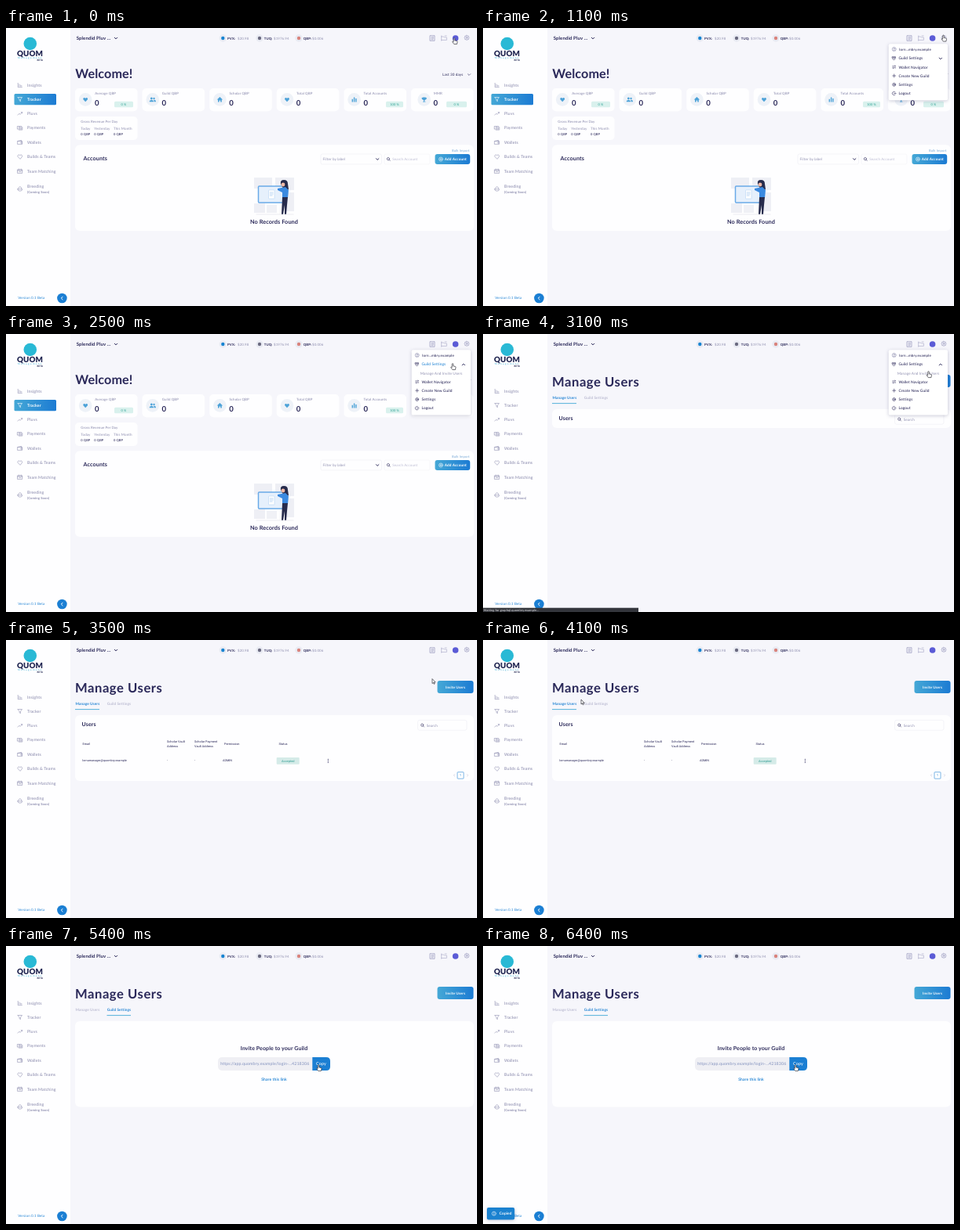
An HTML page that plays this animation: 600 by 355 pixels, repeating every 6500 ms.

```html
<!DOCTYPE html>
<html lang="en">
<head>
<meta charset="utf-8">
<title>Guild invite walkthrough</title>
<style>
html, body { margin: 0; width: 100%; height: 100%; overflow: hidden; background: #f6f6fb; }
svg { display: block; width: 600px; height: 355px; }
text { font-family: Lato, "Open Sans", sans-serif; letter-spacing: .1px; text-rendering: geometricPrecision; white-space: pre; }
.table text { font-family: Roboto, "Liberation Sans", sans-serif; letter-spacing: 0; }
.title { letter-spacing: .55px; }
.line { fill: none; stroke-width: .6; stroke-linecap: round; stroke-linejoin: round; }
.bold { stroke-width: 1; }
.lift { filter: drop-shadow(0 1px 2px rgba(40, 40, 90, .25)); }
</style>
</head>
<body>
<svg id="stage" viewBox="0 0 600 355"></svg>
<script>
const LOOP = 6500, STEP = 100;
const NAVY = '#2a2859', GREY = '#8f8fb0', PALE = '#bcbcd2', BLUE = '#2384d4', MINT = '#d9f1ed', TEAL = '#35a598';

const text = (x, y, s, size, fill = NAVY, weight = 400, extra = '') =>
  `<text x="${x}" y="${y}" font-size="${size}" fill="${fill}" font-weight="${weight}" ${extra}>${s}</text>`;
const mid = (x, y, s, size, fill, weight) => text(x, y, s, size, fill, weight, 'text-anchor="middle"');
const rect = (x, y, w, h, r, fill, extra = '') =>
  `<rect x="${x}" y="${y}" width="${w}" height="${h}" rx="${r}" fill="${fill}" ${extra}/>`;
const dot = (x, y, r, fill, extra = '') => `<circle cx="${x}" cy="${y}" r="${r}" fill="${fill}" ${extra}/>`;
const line = (x, y, d, color = GREY, extra = '', weight = '') =>
  `<path class="line ${weight}" transform="translate(${x} ${y})" d="${d}" stroke="${color}" ${extra}/>`;
const shape = (x, y, d, fill) => `<path transform="translate(${x} ${y})" d="${d}" fill="${fill}"/>`;
const group = (id, body, extra = '') => `<g id="${id}" ${extra}>${body}</g>`;

const DOWN = 'M-1.7-.8L0 .9 1.7-.8', UP = 'M-1.7 .8L0-.9 1.7 .8';
const LENS = 'M1.1 1.1L2.2 2.2M1.5-.2A1.6 1.6 0 1 1-1.7-.2 1.6 1.6 0 1 1 1.5-.2';
const HEART = 'M0 2.8L-2.6 .2C-3.8-1.5-1.4-3.6 0-1.5 1.4-3.6 3.8-1.5 2.6 .2Z';
const RING = 'M2.5 0A2.5 2.5 0 1 1-2.5 0 2.5 2.5 0 1 1 2.5 0';
const GEAR = 'M0-3L1-2.2 2.2-2.2 2.4-1 3 0 2.4 1 2.2 2.2 1 2.3 0 3-1 2.3-2.2 2.2-2.4 1-3 0-2.4-1-2.2-2.2-1-2.2ZM1 0A1 1 0 1 1-1 0 1 1 0 1 1 1 0';
const PEOPLE = 'M-1.4-2.8A1.4 1.4 0 1 1-1.5-2.8ZM1.8-2.6A1.2 1.2 0 1 1 1.7-2.6ZM-4 2.8V1.6Q-1.4-.6 1.1 1.6V2.8ZM1.8 2.8V1.4L1.1 .6Q3-.1 4 1.5V2.8Z';
const HOUSE = 'M0-3.4L3.7 0H2.4V3H.8V1H-.8V3H-2.4V0H-3.7Z';
const BARS = 'M-3-.6H-1.6V3H-3ZM-.7-3H.7V3H-.7ZM1.6-1.4H3V3H1.6Z';
const CUP = 'M-2-3H2V-2.3H3.2Q3.2 .2 1.4 .4L.5 1.2V2.3H1.7V3.1H-1.7V2.3H-.5V1.2L-1.4 .4Q-3.2 .2-3.2-2.3H-2Z';

const NAV = [
  ['Insights', 73, 'M-2.6-2.6V2.6H2.6M-1 1.2V-1M.6 1.2V0M2 1.2V.4'],
  ['Tracker', 91, 'M-2.7-2.5H2.7L.7 .2V2.6L-.7 1.8V.2Z'],
  ['Pluvs', 109.3, 'M-2.8 1.8L-1 0 .4 1 2.8-1.7M1.4-1.7H2.8V-.4'],
  ['Payments', 127.5, 'M-3-2H2V1.6H-3ZM-1.4 2.6H3V-.8M.5-.2A1 1 0 1 1-1.5-.2 1 1 0 1 1 .5-.2'],
  ['Wallets', 146, 'M-2.8-1.5L1.8-2.6V-1.5M-2.8-1.5H2.8V2.4H-2.8ZM2.8-.2H1V1.1H2.8'],
  ['Builds &amp; Teams', 164.3, HEART],
  ['Team Matching', 183, 'M-2.9-2.2H2.9V2.4H-2.9ZM-2.9-.8H2.9M-1.4-3V-1.5M1.4-3V-1.5M-1 1L0 .2 1 1'],
  ['Breeding', 205.5, 'M-3 .3H3Q2.8 2.7 0 2.7T-3 .3ZM-2-.3Q-1.9-2.7 0-2.8 1.9-2.7 2-.3']
];

function sidebar() {
  const items = NAV.map(([name, y, icon], i) =>
    line(17.8, y, icon) + text(27, i === 7 ? 203.8 : y + 1.8, name, 5.25, GREY, 500)).join('');
  const active = rect(10.5, 84, 53.5, 14.3, 1.5, 'url(#cta)') + line(17.8, 91, NAV[1][2], '#fff') +
    text(27, 92.8, 'Tracker', 5.2, '#fff', 700);
  return rect(0, 0, 82, 355, 0, '#fefeff') +
    dot(30.8, 20, 8.3, '#29b9d5') +
    text(14, 36.3, 'QUOM', 9.8, '#1f2450', 900) +
    text(15, 39.2, 'Management', 3, '#29a9d0', 400, 'style="letter-spacing:1.4px"') +
    text(39.5, 42, 'BETA', 3, '#1f2450', 700) +
    items + text(27, 210.8, '(Coming Soon)', 4.2, GREY, 700) + group('active', active) +
    text(15.3, 346.2, 'Version 0.1 Beta', 4.5, BLUE) +
    dot(71.4, 345, 6.3, '#1b7fd3') + line(71.2, 345, 'M.9-1.8L-.9 0 .9 1.8', '#fff', '', 'bold');
}

function topbar() {
  const coins = [[276.3, 'PVX:', '$20.98', 295, '#1884d2'], [323, 'TUQ:', '$1976.94', 341, '#6a6a80'], [373, 'QBP:', '$0.006', 390, '#d9837c']];
  return text(89.7, 14.8, 'Splendid Pluv ...', 6, NAVY, 700) + line(140, 13, DOWN, NAVY, '', 'bold') +
    coins.map(([x, name, price, px, color]) =>
      dot(x, 13, 4.7, '#e9ebf3') + dot(x, 13, 2.2, color) +
      text(x + 5.8, 14.5, name, 4.3, NAVY, 700) + text(px, 14.5, price, 4.4, GREY)).join('') +
    line(543.2, 13, 'M-2.8-3.3H2.8V3.3H-2.8ZM-1.3-1.4H1.3M-1.3 .2H1.3M-1.3 1.8H.8', '#8585b0') +
    line(558, 13, 'M-3.3-3V3.2M-3.3-2H-.6L.4-1H3.4V2.4H-3.3M1-3H3.2', '#a4a4c4') +
    dot(572.6, 13, 3.8, '#5b5bd6') + line(587, 12.4, GEAR, '#8585b0');
}

function dashboard() {
  const cards = [['Average QBP', HEART], ['Guild QBP', PEOPLE], ['Scholar QBP', HOUSE], ['Total QBP', HEART],
    ['Total Accounts', BARS], ['MMR', CUP]];
  const badges = { 0: [138, 24, '0 %'], 4: [484, 22, '100 %'], 5: [561, 26, '0 %'] };
  const tiles = cards.map(([name, icon], i) => {
    const x = 88 + 85.6 * i, push = i === 5 ? 3.5 : 0, b = badges[i];
    return rect(x, 77, 79.6, 29.3, 5, '#fefeff') + dot(x + 13.2 + push, 91.4, 8.3, '#eef2f8') +
      shape(x + 13.2 + push, 91.4, icon, '#4ca2d8') +
      text(x + 25.2 + push, 85.4, name, 4.4, GREY, 500) + text(x + 25 + push, 98.6, '0', 9.6, NAVY, 700) +
      (b ? rect(b[0], 93.8, b[1], 7.4, 1.5, MINT) + mid(b[0] + b[1] / 2, 98.9, b[2], 4, TEAL, 500) : '');
  }).join('');
  const revenue = rect(88, 113, 79.6, 30, 5, '#fefeff') + text(95.3, 120.8, 'Gross Revenue Per Day', 4.4, GREY, 500) +
    [[95.3, 'Today'], [112.3, 'Yesterday'], [137, 'This Month']].map(([x, s]) =>
      text(x, 129.6, s, 4.5, GREY) + text(x, 137, '0 QBP', 4, NAVY, 500)).join('');
  const accounts = rect(88, 149.3, 508, 109.7, 6, '#fefeff') + text(98.5, 169.3, 'Accounts', 7.2, NAVY, 700) +
    text(568, 157.8, 'Bulk Import', 4.2, '#7aaad6') +
    rect(401, 161, 77.5, 13, 2, '#fefeff', 'stroke="#ececf3" stroke-width=".6"') +
    text(403.6, 169, 'Filter by label', 4.6, GREY) + line(473.2, 167.5, DOWN, NAVY, '', 'bold') +
    rect(482, 161, 58, 13, 2, '#fefeff', 'stroke="#f1f1f6" stroke-width=".6"') +
    line(487, 167.3, LENS, NAVY) + text(492.3, 169, 'Search Account', 4.5, PALE) +
    rect(546.5, 161, 44.7, 13, 3, 'url(#cta)') + line(554, 167.5, RING + 'M-1.2 0H1.2M0-1.2V1.2', '#fff') +
    text(558.8, 169.1, 'Add Account', 4.7, '#fff', 700) + picture() +
    mid(341.5, 249.6, 'No Records Found', 7.3, NAVY, 700);
  return text(88.3, 64.3, 'Welcome!', 16.2, NAVY, 700) +
    text(556, 61.2, 'Last 30 days', 4.6, NAVY) + line(590, 59.5, DOWN, NAVY) + tiles + revenue + accounts;
}

function picture() {
  return rect(316, 191, 23, 14, 0, '#eeeff5') + rect(343, 191, 24, 16, 0, '#eeeff5') +
    rect(316, 224, 14, 12, 0, '#eeeff5') + rect(332, 226, 13, 10, 0, '#f0f1f6') + rect(357, 210, 10, 24, 0, '#eeeff5') +
    rect(321.5, 202, 32, 21, 1, '#e6f0fc', 'stroke="#6aaae8" stroke-width="1.5"') +
    rect(334.5, 207, 7.5, 11, .5, '#fff', 'stroke="#a8cdf2" stroke-width=".5"') +
    line(338.2, 212, 'M-2-2H2M-2 0H2M-2 2H1', '#8fbdec') +
    shape(354, 196, 'M-4 3Q-5-2 0-2 5-2 5 3L6 10 2 12-2 7Z', '#262b4c') +
    dot(353, 200, 2.4, '#f0b9a6') +
    shape(354, 203, 'M-3 1L2 0 6 4 5 14H-2L-2 7-8 4-8 2Z', '#3b8ae0') +
    shape(354, 216, 'M-2 0H5L4 10 3 22H1L1 10-1 22H-3Z', '#262b4c') +
    line(341, 238, 'M-22 0H25', '#dddde8');
}

function managePage() {
  const tabs = (a, b) => text(88.5, 83, 'Manage Users', 4.7, a, 700) + text(128.7, 83, 'Guild Settings', 4.7, b, 700);
  const underline = (x, w) => rect(x, 88.2, w, .9, 0, '#43a9d6');
  const head = [[97.5, 'Email'], [278, 'Permission'], [347.5, 'Status']].map(([x, s]) => text(x, 133.7, s, 3.9, NAVY)).join('') +
    [[205, 'Scholar Vault', 'Address'], [240, 'Scholar Payment', 'Vault Address']].map(([x, a, b]) =>
      text(x, 130.7, a, 3.9, NAVY) + text(x, 136.5, b, 3.9, NAVY)).join('');
  const row = text(97.3, 155.3, 'lornamanager@quombry.example', 3.75, NAVY) + text(205, 155, '-', 4) + text(240, 155, '-', 4) +
    text(276, 155.3, 'ADMIN', 3.8, NAVY) + rect(344.7, 150, 29, 8.8, 1, '#d5ebe8') + mid(359.2, 155.8, 'Accepted', 3.9, '#2b9a90') +
    [-2, 0, 2].map(d => dot(410.3, 154.4 + d, .55, NAVY)).join('') +
    line(571, 172.8, 'M.6-1.2L-.6 0 .6 1.2', PALE) + line(588, 172.8, 'M-.6-1.2L.6 0-.6 1.2', PALE) +
    rect(575, 168.7, 8, 8.4, .8, '#fff', `stroke="${BLUE}" stroke-width=".6"`) + mid(579, 174.4, '1', 4.2, BLUE);
  const users = rect(88, 96, 508, 24, 6, '#fefeff', 'id="panel"') + text(96.6, 110.2, 'Users', 7, NAVY, 700) +
    rect(524.5, 102.3, 62.5, 13, 2.5, '#fefeff', 'stroke="#ededf4" stroke-width=".6"') +
    line(530.3, 108.8, LENS, NAVY) + text(535.7, 110.6, 'Search', 4.6, GREY) + group('rows', head + row, 'class="table"');
  const invite = rect(88, 96, 508, 109.5, 6, '#fefeff') + mid(341.5, 132.8, 'Invite People to your Guild', 7, NAVY, 700) +
    rect(270, 142, 125, 17, 5, '#efeff4') +
    text(273.2, 152.3, 'https://app.quombry.example/login-...4218306', 5.3, '#8190bd') +
    `<path d="M390.3 142H408Q413 142 413 147V154Q413 159 408 159H390.3Z" fill="#1b7fd3"/>` +
    mid(401.5, 152.3, 'Copy', 5.4, '#fff', 500) + mid(341.5, 171.8, 'Share this link', 5, BLUE, 700);
  return text(88, 67.3, 'Manage Users', 16.6, NAVY, 700, 'class="title"') +
    rect(549.5, 52, 46, 16, 3, 'url(#cta)') + mid(572.5, 61.6, 'Invite Users', 4.5, '#fff', 700) +
    group('users', tabs(BLUE, PALE) + underline(88, 31) + users) +
    group('invite', tabs(PALE, BLUE) + underline(128.5, 30.5) + invite);
}

function menu() {
  const item = (y, s, icon) => line(523.7, y, icon, NAVY) + text(529.5, y + 1.7, s, 4.8, NAVY, 500);
  const lower = item(49.8, 'Wallet Navigator', 'M-2-1H2L1-2M2 1H-2L-1 2') + item(61, 'Create New Guild', 'M-2 0H2M0-2V2') +
    item(72.3, 'Settings', 'M2 0A2 2 0 1 1-2 0 2 2 0 1 1 2 0M.7 0A.7 .7 0 1 1-.7 0 .7 .7 0 1 1 .7 0') +
    item(83.5, 'Logout', 'M1.4-1.6A2.2 2.2 0 1 0 1.4 1.6M0 0H2.4');
  return rect(516.7, 20.3, 75.3, 72, 2, '#fff', 'id="sheet" class="lift"') +
    line(523.7, 27, RING + 'M.8-.7A.8 .8 0 1 1-.8-.7 .8 .8 0 1 1 .8-.7M-1.5 1.8Q0 .3 1.5 1.8') +
    text(530.3, 28.7, 'lorn...mbry.example', 4.5, NAVY, 500) +
    line(523.5, 38.5, 'M-2.2-1.6H2.2L1.4 1.2 0 2.2-1.4 1.2ZM-1-1.6L0 .6 1-1.6', NAVY) +
    text(529.5, 40.2, 'Guild Settings', 4.8, NAVY, 500, 'id="guild"') +
    line(582.8, 39, DOWN, NAVY, 'id="fold"', 'bold') +
    text(527.7, 51.5, 'Manage And Invite Users', 4.7, GREY, 400, 'id="sub"') + group('lower', lower);
}

const overlays =
  group('status', rect(0, 349.7, 198, 5.3, 0, '#34363c') + text(.5, 354, 'Waiting for graphql.quombry.example...', 3.9, '#e4e4e8')) +
  group('toast', rect(5, 334, 35.2, 15.5, 2, '#1b82d0', 'class="lift"') + line(14, 341.7, RING + 'M0-.2V1.3M0-1.3V-1.2', '#fff') +
    text(20.8, 343.4, 'Copied', 4.8, '#fff', 700)) +
  group('cursor', `<path id="hand" d="M-.8 .5Q-.8-.3 0-.3T.8 .5V3L3 3.4Q4 3.6 4 4.6L3.4 7.6H-.2L-2.3 4.8Q-2.4 4-1.6 4.1L-.8 4.7Z"/>
    <path id="arrow" d="M0 0V6L1.4 4.8 2.3 6.8 3.2 6.4 2.3 4.4H4.2Z"/>`,
    'fill="#fff" stroke="#24242c" stroke-width=".65" stroke-linejoin="round"');

document.getElementById('stage').innerHTML =
  `<defs><linearGradient id="cta"><stop stop-color="#45a8d6"/><stop offset="1" stop-color="#1c7bd3"/></linearGradient></defs>` +
  rect(0, 0, 600, 355, 0, '#f6f6fb') + sidebar() + topbar() + group('home', dashboard()) + group('manage', managePage()) +
  group('menu', menu()) + overlays;

const el = {};
document.querySelectorAll('#stage [id]').forEach(n => el[n.id] = n);
const show = (id, v) => el[id].setAttribute('opacity', +v);
const set = (id, name, v) => el[id].setAttribute(name, v);
const ramp = (t, a, b) => Math.min(1, Math.max(0, (t - a) / (b - a)));
const ease = p => p * p * (3 - 2 * p);

// time, x, y of the pointer tip
const PATH = [[0, 571, 13], [100, 571, 13], [600, 586.5, 9.5], [1400, 586.5, 9.5], [1900, 569, 38], [2500, 569, 38],
  [2800, 567.5, 48], [3400, 567.5, 48], [4100, 125, 76], [4400, 142, 79], [4800, 142, 79], [5300, 398, 152], [LOOP, 398, 152]];

function pointer(t) {
  const i = PATH.findIndex(k => k[0] > t), a = PATH[i - 1], b = PATH[i];
  const p = ease(ramp(t, a[0], b[0]));
  return [a[1] + (b[1] - a[1]) * p, a[2] + (b[2] - a[2]) * p];
}

function draw(t) {
  const onManage = t >= 3000, onInvite = t >= 4600, loaded = t >= 3400;
  show('home', !onManage);
  show('active', !onManage);
  show('manage', onManage);
  show('users', !onInvite);
  show('invite', onInvite);
  show('rows', loaded);
  set('panel', 'height', loaded ? 84 : 24);
  show('status', onManage && t < 3500);
  show('toast', ramp(t, 5900, 6200));

  const open = ease(ramp(t, 2000, 2300));
  show('menu', t < 3500 ? ramp(t, 500, 700) : 0);
  set('sheet', 'height', 72 + 11.2 * open);
  set('lower', 'transform', `translate(0 ${11.2 * open})`);
  show('sub', open);
  set('guild', 'fill', t >= 1800 && t < 2700 ? BLUE : NAVY);
  set('fold', 'd', open ? UP : DOWN);

  const [x, y] = pointer(t);
  const arrow = (t > 100 && t < 400) || (t > 3400 && t < 4300) || (t > 4800 && t < 5300);
  set('cursor', 'transform', `translate(${x} ${y})`);
  show('arrow', arrow);
  show('hand', !arrow);
}

const start = performance.now();
function tick() {
  const t = (performance.now() - start) % LOOP;
  draw(Math.floor(t / STEP) * STEP);
  requestAnimationFrame(tick);
}
tick();
</script>
</body>
</html>
```
